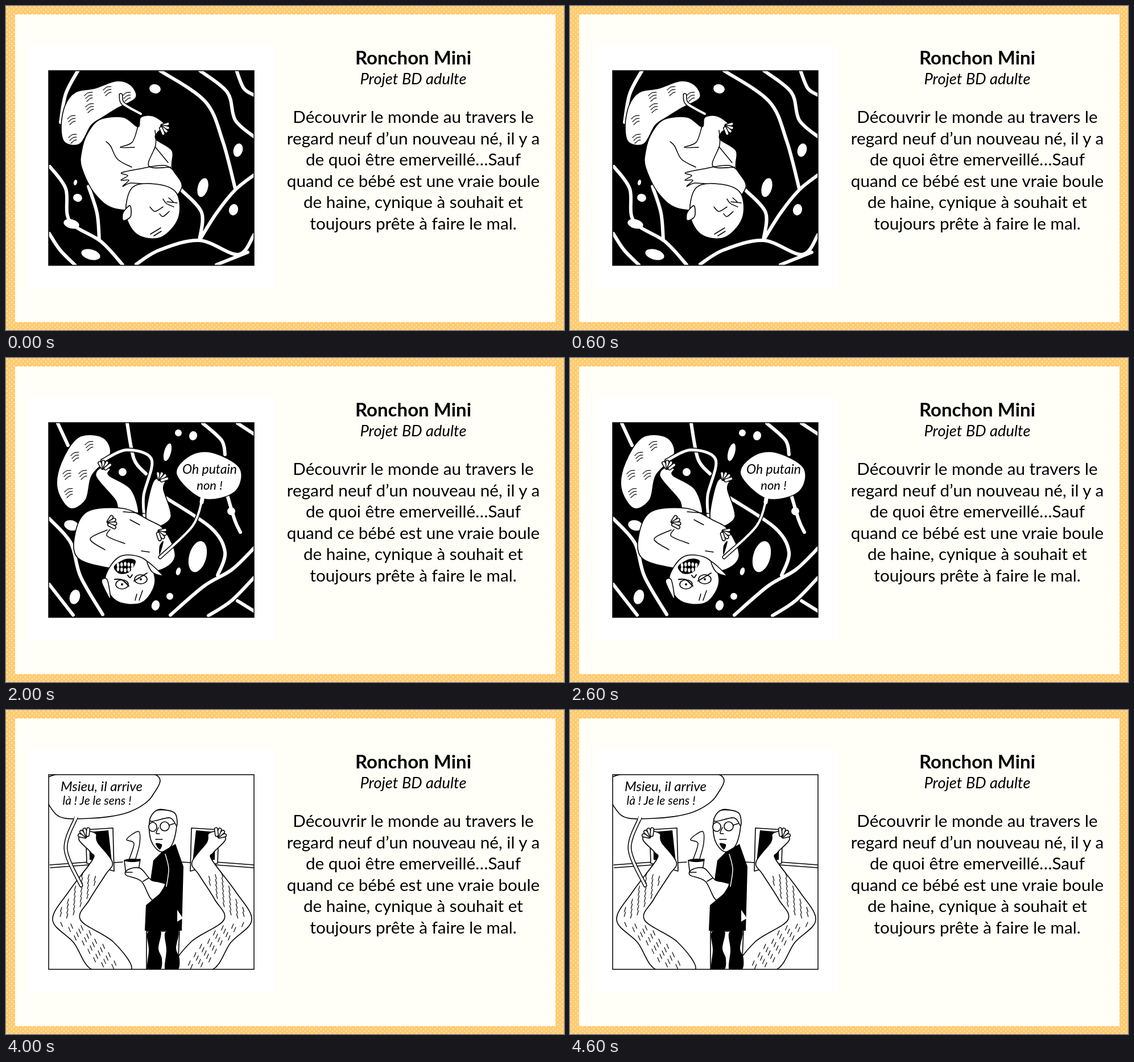
These frames come from a looping animation (981 px wide and 571 px high, 5000 ms). An HTML page:

```html
<!DOCTYPE html>
<html lang="fr">
<head>
<meta charset="utf-8">
<title>Projet BD</title>
<style>
html, body { margin: 0; height: 100%; overflow: hidden }
svg { display: block; width: 100vw; height: 100vh }
text { text-anchor: middle; font: 29.7px Lato, "Open Sans", sans-serif }
path, ellipse { stroke-linecap: round; stroke-linejoin: round }
.vein { fill: none; stroke: #fff; stroke-width: 6px }
.ink { fill: none; stroke: #000; stroke-width: 1.5px }
.body { fill: #fff; stroke: #000; stroke-width: 1.6px }
.white { fill: #fff }
#art text { font-style: italic }
</style>
</head>
<body>
<svg viewBox="0 0 981 571">
  <pattern id="dots" width="8" height="8" patternUnits="userSpaceOnUse">
    <rect width="8" height="8" fill="#ffcb72"/>
    <circle cx="2" cy="2" r="1" fill="#fff3d8"/><circle cx="6" cy="6" r="1" fill="#fff3d8"/>
  </pattern>
  <clipPath id="box"><rect x="75" y="114" width="361" height="343"/></clipPath>
  <rect width="981" height="571" fill="url(#dots)"/>
  <rect x="16" y="15" width="950" height="542" fill="#fffef7"/>
  <rect x="42" y="70" width="430" height="430" fill="#fff"/>
  <text x="716" y="103" style="font-size:33px;font-weight:700">Ronchon Mini</text>
  <text x="716" y="138" style="font-size:27.3px;font-style:italic">Projet BD adulte</text>
  <g id="blurb"></g>
  <g id="art" clip-path="url(#box)"></g>
  <rect class="ink" x="75" y="114" width="361" height="343"/>
</svg>
<script>
blurb.innerHTML = `Découvrir le monde au travers le
regard neuf d’un nouveau né, il y a
de quoi être emerveillé…Sauf
quand ce bébé est une vraie boule
de haine, cynique à souhait et
toujours prête à faire le mal.`.split('\n')
  .map((line, i) => `<text x="716" y="${206 + 37.5 * i}">${line}</text>`).join('');

let out = '';
const points = spec => {
  const n = spec.trim().split(/\s+/).map(Number);
  return n.flatMap((x, i) => i % 2 ? [] : [[x, n[i + 1]]]);
};

// Smooth curve through the points; "/" starts a new stroke.
function smooth(spec, closed) {
  return spec.split('/').map(part => {
    const p = points(part), len = p.length;
    const at = i => closed ? p[(i + len) % len] : p[Math.max(0, Math.min(len - 1, i))];
    const lean = (q, a, b) => q.map((v, j) => v + (b[j] - a[j]) / 6);
    let d = 'M' + p[0];
    for (let i = 0; i < (closed ? len : len - 1); i++) {
      const b = at(i), c = at(i + 1);
      d += `C${lean(b, at(i - 1), c)} ${lean(c, at(i + 2), b)} ${c}`;
    }
    return d;
  }).join('');
}
const path = (cls, d, width) =>
  out += `<path class="${cls}" d="${d}" ${width ? `style="stroke-width:${width}px"` : ''}/>`;
const vein = (spec, width) => path('vein', smooth(spec), width);
const ink = (spec, width) => path('ink', smooth(spec), width);
const body = spec => path('body', smooth(spec, true) + 'Z');
const fill = spec => path('', smooth(spec, true) + 'Z');
const poly = (cls, spec) => path(cls, `M${spec}Z`);
const blob = (cls, x, y, rx, ry, turn = 0) =>
  out += `<ellipse class="${cls}" cx="${x}" cy="${y}" rx="${rx}" ry="${ry}" transform="rotate(${turn} ${x} ${y})"/>`;
const blobs = spec => spec.split('/').forEach(s => blob('white', ...s.trim().split(' '), 15));
const say = (x, y, size, words) =>
  out += `<text x="${x}" y="${y}" style="font-size:${size}px">${words}</text>`;
const dark = () => poly('', '75 114H436V457H75');

function tube(spec, width) {
  ink(spec, width + 3);
  vein(spec, width);
}
function hatch(spec) {
  for (const [x, y] of points(spec))
    for (let i = 0; i < 3; i++)
      ink(`${x + 2 * i} ${y + 5 * i} ${x + 6 + 2 * i} ${y - 5 + 5 * i} ${x + 14} ${y - 6 + 5 * i}`, 1.2);
}
// Fingers or toes spread around a direction in degrees.
function fan(x, y, aim) {
  for (let i = 0; i < 4; i++) {
    const a = (aim - 42 + 28 * i) * Math.PI / 180, c = Math.cos(a), s = Math.sin(a);
    tube(`${x + 4 * c} ${y + 4 * s} ${x + 14 * c} ${y + 14 * s}`, 4);
  }
}
function teeth(x, y, width, gap) {
  for (let i = 0; i < 5; i++)
    for (const row of [0, gap])
      blob('white', x + width * i / 4, y + row + (row ? -1 : 1) * Math.abs(i - 2), width / 11, gap / 3);
}
function eyes(spec) {
  for (const [x, y] of points(spec)) {
    blob('body', x, y, 11, 8);
    blob('', x, y, 2, 2);
  }
}
// Short dashes scattered along a limb.
function hairs(x, y, dx, dy, spread) {
  for (let i = 0; i < 26; i++) {
    const k = i / 25, side = (i * 0.382 % 1 - 0.5) * spread;
    const hx = x + dx * k + side, hy = y + dy * k;
    ink(`${hx} ${hy} ${hx + dx / 20} ${hy + 8}`, 1.2);
  }
}
function scene(id, draw) {
  out = '';
  draw();
  art.innerHTML += `<g id="${id}">${out}</g>`;
}

scene('curled', () => {
  dark();
  vein('127 113 105 155 96 205 / 271 114 350 168 381 238 403 322 / 437 297 403 324 370 365 340 413 / 308 324 344 364 340 412');
  vein('341 114 389 152 403 201 437 231 / 405 113 418 145 436 157 / 77 283 105 322 112 379 167 415 205 456 / 145 318 160 365 164 413');
  vein('76 401 95 430 121 456 / 229 455 270 430 340 413 408 438 436 403 / 370 456 425 434');
  blobs('262 146 10 8 / 408 254 8 12 / 346 320 9 17 / 400 359 8 10 / 122 311 3 5 / 126 338 8 7 / 115 384 14 8 / 149 438 17 9');
  body('97 212 104 175 122 152 156 145 195 132 220 140 228 162 196 180 172 195 150 210 130 243 103 240');
  hatch('138 158 171 148 205 158 108 199 110 232 140 178');
  tube('202 157 206 172 237 190', 4);
  body('165 200 206 196 232 213 237 196 259 194 281 211 267 222 264 235 292 255 292 285 309 320 270 355 195 358 157 332 133 285 133 255 143 225');
  fan(271, 212, 25);
  ink('262 219 263 245 251 282 290 284 / 232 212 222 240 201 249 226 249 / 176 239 184 247 196 270 221 284 / 262 248 285 276');
  ink('305 300 280 281 235 287 203 294 214 299 202 307 216 307 205 318 219 312 245 314');
  body('222 320 265 314 300 330 303 374 272 408 231 403 211 367');
  body('218 352 206 364 206 378 219 371');
  ink('254 402 272 391 / 260 405 273 397');
});

scene('asleep', () =>
  ink('253 354 262 362 276 354 / 283 345 301 347 / 270 366 276 371 287 362 / 276 340 282 348 295 354 / 286 338 294 345'));

scene('awake', () => {
  body('283 165 293 140 315 136 341 144 365 135 386 143 401 195 386 235 350 247 297 236 286 205');
  tube('336 248 328 283 296 313', 3);
  vein('337 242 336 248', 5);
  fill('269 326 291 321 297 343 274 341');
  teeth(276, 326, 15, 12);
  eyes('267 357 293 368');
  ink('255 351 277 361 / 301 360 286 371 / 274 363 279 369 285 362', 2);
  say(343, 166, 24, 'Merde, y');
  say(338, 195, 19, 's’passe quoi');
  say(352, 223, 22, 'là ?');
});

scene('falling', () => {
  dark();
  vein('91 115 109 154 / 213 115 225 178 246 204 / 346 115 379 145 385 170 / 407 115 436 134 / 282 247 360 299 385 342 372 383');
  vein('388 238 402 285 412 307 / 437 334 397 373 348 402 289 453 / 356 454 396 428 436 387 / 407 428 436 446');
  vein('76 283 114 326 131 385 170 452 / 76 399 118 453');
  blobs('303 132 6 6 / 329 137 7 8 / 284 166 6 16 / 205 201 7 7 / 115 295 13 9 / 337 350 15 28 / 121 421 9 13 / 288 420 6 6 / 263 436 7 9 / 303 376 4 7 / 396 270 7 7');
  body('127 140 170 140 183 170 151 207 140 250 112 265 90 230 97 185');
  hatch('139 153 114 172 100 204 103 236 128 204');
  tube('170 181 212 162 256 179 242 242 243 280', 5);
  body('158 208 172 190 183 196 181 207 220 232 232 278 200 272 192 250');
  fan(172, 197, -80);
  body('258 220 274 212 280 218 277 232 290 280 262 298 246 280');
  fan(270, 217, -60);
  body('144 270 205 265 250 285 279 304 297 351 262 376 187 371 126 352 122 307');
  fill('270 331 277 323 270 347');
  fan(178, 292, -15);
  fan(266, 306, 30);
  ink('178 303 148 319 174 338 / 183 302 178 314 209 327 / 206 271 244 274 / 218 285 235 294 / 238 340 252 342');
  body('200 350 244 355 262 394 239 431 194 428 174 390');
  body('178 391 168 394 183 424');
  body('249 359 275 383 257 377');
  fill('190 367 211 354 228 358 217 377 199 380');
  teeth(197, 363, 25, 11);
  eyes('204 399 237 390');
  ink('191 390 204 391 216 402 / 225 393 248 379 / 214 383 218 387 222 382', 2);
  ink('227 427 230 416 / 234 427 240 410');
  body('300 206 320 174 360 166 411 194 402 236 346 248');
  tube('345 249 328 296 271 351', 4);
  vein('346 243 344 254', 7);
  say(358, 204, 23, 'Oh putain');
  say(358, 232, 22, 'non !');
});

scene('screaming', () => {
  dark();
  vein('260 115 268 143 / 352 144 397 203 437 236 / 125 232 147 290 130 387 191 455 / 76 311 114 339 132 392 / 77 390 131 456');
  vein('397 228 422 283 412 388 368 455 / 437 322 411 356 / 280 456 360 438 437 397');
  blobs('417 150 9 14 / 408 257 8 10 / 172 302 11 17 / 109 211 4 8 / 188 417 10 15 / 138 436 9 7 / 169 393 5 5 / 260 440 14 8 / 393 408 6 14');
  body('107 183 134 145 168 129 182 140 160 207 140 232 107 215');
  hatch('126 160 117 184 116 212 146 190');
  tube('162 158 173 176 195 188', 5);
  vein('196 196 166 209 170 236');
  body('175 240 193 232 215 243 256 250 284 300 325 270 372 238 385 218 385 252 342 295 352 326 386 300 370 276 395 270 407 315 365 360 300 390 250 418 205 390 192 355 167 340 190 330 212 358 260 378 238 320 248 280 183 266');
  fan(185, 236, -95);
  fan(384, 222, -100);
  fan(378, 274, -80);
  fan(181, 340, -100);
  ink('243 246 251 257 / 231 331 240 344 / 258 331 270 331 / 326 268 323 284 / 364 329 379 328');
  tube('290 222 301 249 291 272 310 290 296 316', 8);
  tube('325 219 329 263 313 341', 6);
  body('290 362 345 355 366 390 350 432 300 440 280 405');
  body('284 387 272 405 284 425');
  body('363 386 377 400 360 414');
  fill('287 375 316 362 347 370 338 399 297 396');
  teeth(296, 373, 42, 20);
  eyes('310 418 338 418');
  ink('295 407 310 407 323 413 338 407 353 407 / 317 428 325 423 329 428', 2);
  body('194 169 205 143 294 135 350 150 345 210 259 223 200 202');
  say(270, 173, 22, 'Vous m’aurez');
  say(266, 206, 21, 'pas ! Jamais !');
});

scene('delivery', () => {
  // Both sides mirror each other.
  for (const flip of ['', 'translate(514) scale(-1 1)']) {
    out += `<g transform="${flip}">`;
    ink('77 273 145 268 / 78 278 145 273 / 188 269 205 268');
    poly('body', '140 211 188 208 190 284 142 270');
    poly('', '146 215 180 212 186 268 147 264');
    body('128 228 141 214 158 218 161 233 187 268 175 290 147 334 131 370 189 409 220 458 152 458 119 410 82 370 111 319 152 264 149 251');
    fan(143, 224, -125);
    hairs(152, 287, -45, 72, 34);
    hairs(116, 374, 68, 74, 40);
    out += '</g>';
  }
  body('77 117 255 112 258 150 216 180 146 191 87 183');
  tube('123 190 105 245 132 309', 4);
  vein('124 187 122 192', 5);
  say(168, 143, 24, 'Msieu, il arrive');
  say(160, 167, 21, 'là ! Je le sens !');
  ink('217 262 225 235 212 228 233 214 235 235 228 262');
  poly('body', '208 265 236 263 232 289 211 290');
  blob('', 222, 265, 14, 3);
  body('215 281 236 279 256 300 280 306 258 335 238 302 211 291');
  ink('210 286 222 286 / 241 302 251 296');
  body('253 193 255 230 273 250 293 235 299 190 271 175');
  body('254 196 265 177 296 181 300 204 288 190');
  blob('body', 258, 206, 7, 8);
  blob('body', 279, 205, 8, 8);
  ink('287 203 296 200 / 268 207 264 217 270 218 / 263 228 275 228');
  fill('263 235 274 237 270 246');
  poly('', '274 250 298 236 312 276 309 389 244 389 246 344 270 324 281 307 254 300 259 265');
  vein('280 254 286 280 282 311', 1.5);
  poly('white', '301 352 301 373 311 367');
  poly('body', '247 390 305 390 302 459 247 459');
  for (const dx of [0, 31]) {
    out += `<g transform="translate(${dx})">`;
    fill('249 392 272 390 268 420 274 438 271 458 249 459 251 423');
    out += '</g>';
  }
});

const shots = ['curled asleep', 'curled awake', 'falling', 'screaming', 'delivery'];
function tick() {
  const shown = shots[Math.floor(performance.now() % 5000 / 1000)].split(' ');
  for (const g of art.children) g.style.display = shown.includes(g.id) ? '' : 'none';
  requestAnimationFrame(tick);
}
tick();
</script>
</body>
</html>
```
